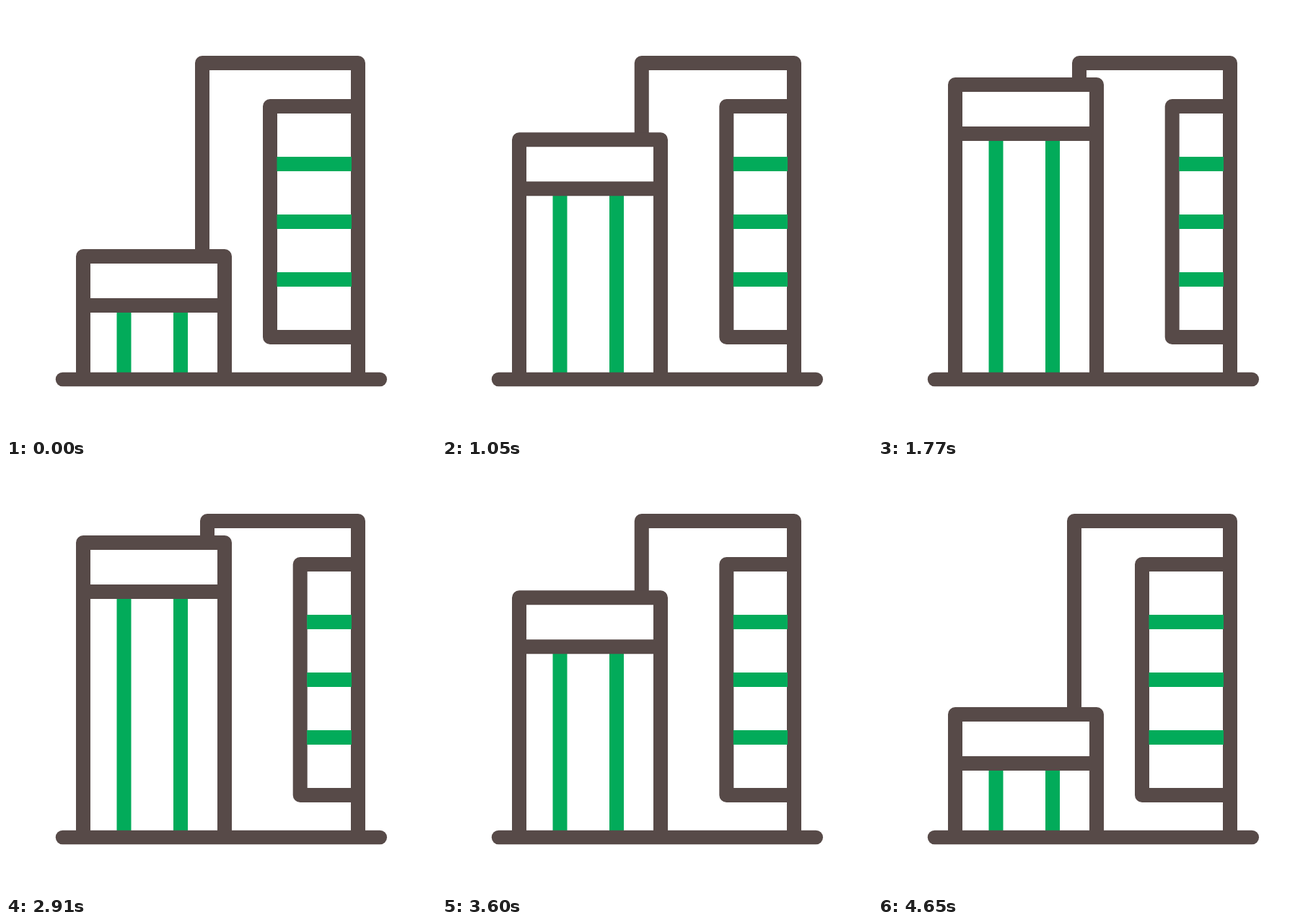
An HTML page with a canvas for the animation above (5400 ms loop, 596 px wide and 596 px high).

```html
<!DOCTYPE html>
<html lang="en">
<head>
<meta charset="utf-8">
<title>Buildings</title>
<style>
  html, body { margin: 0; width: 100%; height: 100%; overflow: hidden; background: #fff; }
  canvas { display: block; width: 596px; height: 596px; }
</style>
</head>
<body>
<canvas id="stage" width="596" height="596"></canvas>
<script>
const ctx = document.getElementById('stage').getContext('2d');
const DARK = '#574a48', GREEN = '#02ab5a';
const LOOP = 5400, STEP = 30, MOVE = 1770, FALL_END = 4650;
const GROUND = 517.5, RIGHT = 488;

// Cubic bezier (0.5, 0, 0.5, 1), solved by bisection.
function ease(x) {
  if (x <= 0) return 0;
  if (x >= 1) return 1;
  let lo = 0, hi = 1;
  for (let i = 0; i < 30; i++) {
    const s = (lo + hi) / 2;
    if (1.5 * s * (1 - s) + s * s * s < x) lo = s; else hi = s;
  }
  return lo * lo * (3 - 2 * lo);
}

// The fall is the rise played backwards.
function progress(t) {
  return ease(Math.min(t, FALL_END - t) / MOVE);
}

const mix = (a, b, p) => a + (b - a) * p;

function line(color, cap, ...points) {
  ctx.strokeStyle = color;
  ctx.lineCap = cap;
  ctx.beginPath();
  points.forEach(([x, y]) => ctx.lineTo(x, y));
  ctx.stroke();
}

function draw(t) {
  const p = progress(t);
  const top = mix(347, 109, p);
  const sill = top + 68;
  const towerX = mix(272, 279, p);
  const panelX = mix(366, 407.7, p);

  ctx.fillStyle = '#fff';
  ctx.fillRect(0, 0, 596, 596);
  ctx.lineWidth = 20;
  ctx.lineJoin = 'round';

  // Tower and its side panel
  line(DARK, 'butt', [towerX, top], [towerX, 79], [RIGHT, 79], [RIGHT, GROUND]);
  line(DARK, 'butt', [RIGHT, 139], [panelX, 139], [panelX, 459], [RIGHT, 459]);
  for (const y of [219, 299, 379]) line(GREEN, 'butt', [panelX + 9.5, y], [479, y]);

  // Front block
  for (const x of [163.5, 242]) line(GREEN, 'butt', [x, sill], [x, GROUND]);
  line(DARK, 'butt', [107, GROUND], [107, top], [303, top], [303, GROUND]);
  line(DARK, 'butt', [107, sill], [303, sill]);

  ctx.lineWidth = 19.5;
  line(DARK, 'round', [78.5, GROUND], [518.3, GROUND]);
}

function tick() {
  const t = performance.now() % LOOP;
  draw(Math.floor(t / STEP) * STEP);
  requestAnimationFrame(tick);
}
tick();
</script>
</body>
</html>
```
